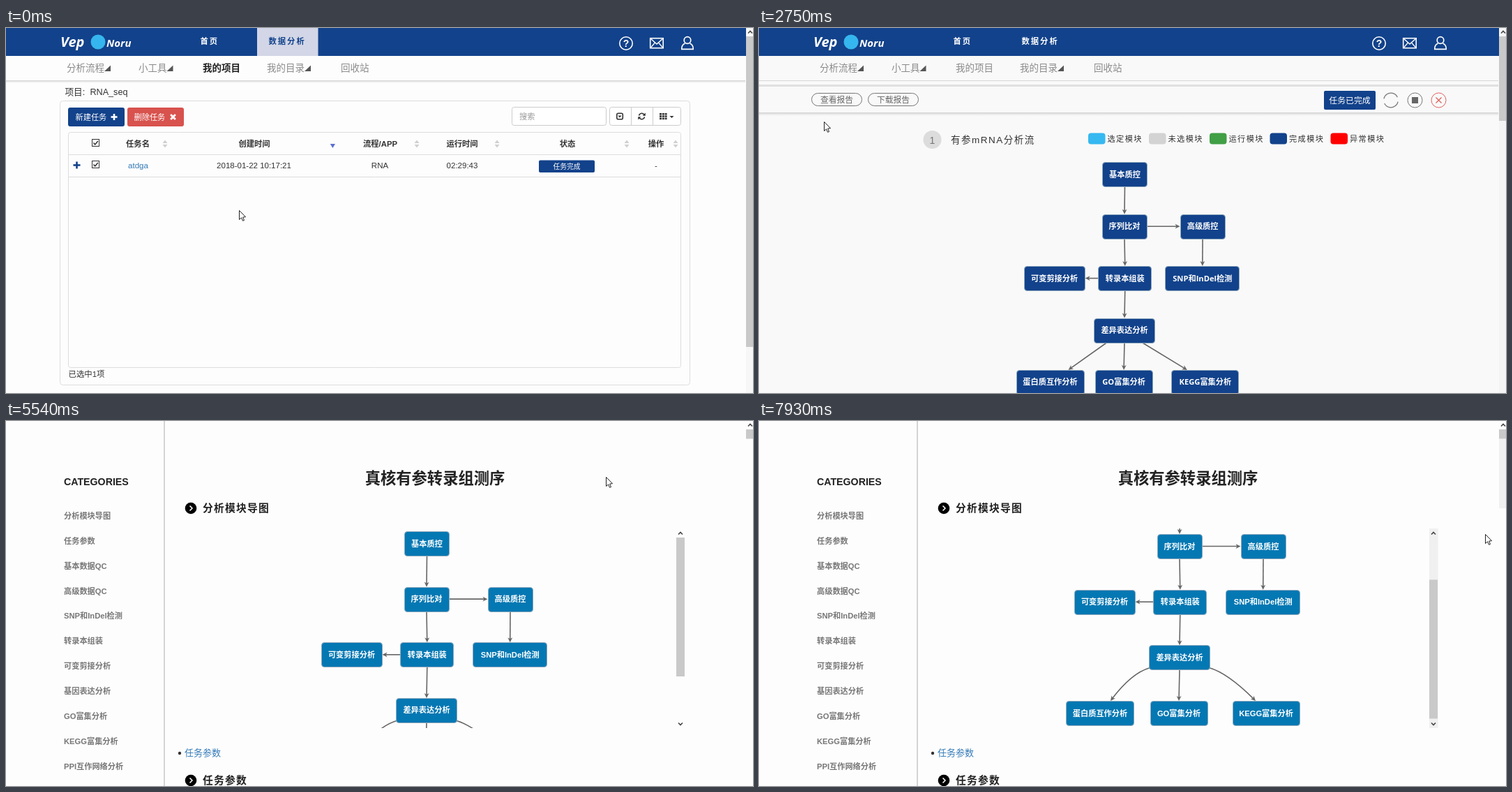
An HTML page with a canvas for the animation above (8 s loop, 1071 px wide and 523 px high).

```html
<!DOCTYPE html>
<html lang="zh-CN">
<head>
<meta charset="utf-8">
<title>任务报告</title>
<style>
html, body { margin: 0; width: 100%; height: 100%; overflow: hidden; background: #fefefe; }
canvas { display: block; width: 1071px; height: 523px; }
</style>
</head>
<body>
<canvas id="stage" width="1071" height="523"></canvas>
<script>
const ctx = document.getElementById('stage').getContext('2d');
const LOOP = 8000;
const NAVY = '#12428b', GRAY = '#666', THUMB = '#c9c9c9';
const SANS = '"Liberation Sans", "Noto Sans CJK SC", "Noto Sans CJK", sans-serif';
const ROUND = '"Open Sans", "Noto Sans CJK SC", "Noto Sans CJK", sans-serif';

// Text with y at its optical middle, on a whole-pixel baseline
function text(s, x, y, size, color, o = {}) {
  ctx.font = `${o.italic ? 'italic ' : ''}${o.bold ? 'bold ' : ''}${size}px ${o.font || SANS}`;
  ctx.letterSpacing = (o.space || 0) + 'px';
  ctx.textAlign = o.align || 'left';
  ctx.fillStyle = color;
  ctx.fillText(s, x, Math.round(y + size * 0.36));
  ctx.letterSpacing = '0px';
}

function rect(x, y, w, h, color) {
  ctx.fillStyle = color;
  ctx.fillRect(x, y, w, h);
}

function box(x, y, w, h, r, fill, stroke, width = 1) {
  ctx.beginPath();
  ctx.roundRect(x, y, w, h, r);
  paint(fill, stroke, width);
}

function circle(x, y, r, fill, stroke, width = 1) {
  ctx.beginPath();
  ctx.arc(x, y, r, 0, 7);
  paint(fill, stroke, width);
}

function paint(fill, stroke, width) {
  if (fill) { ctx.fillStyle = fill; ctx.fill(); }
  if (stroke) { ctx.strokeStyle = stroke; ctx.lineWidth = width; ctx.stroke(); }
}

function line(color, width, ...p) {
  ctx.beginPath();
  for (let i = 0; i < p.length; i += 2) ctx.lineTo(p[i], p[i + 1]);
  paint(null, color, width);
}

function poly(color, ...p) {
  ctx.beginPath();
  for (let i = 0; i < p.length; i += 2) ctx.lineTo(p[i], p[i + 1]);
  ctx.closePath();
  paint(color);
}

function cross(x, y, r, color, width) {
  line(color, width, x - r, y - r, x + r, y + r);
  line(color, width, x + r, y - r, x - r, y + r);
}

function plus(x, y, r, color, width) {
  line(color, width, x - r, y, x + r, y);
  line(color, width, x, y - r, x, y + r);
}

function chevron(x, y, dir) {
  line('#444', 1.6, x - 3, y + 1.5 * dir, x, y - 1.5 * dir, x + 3, y + 1.5 * dir);
}

function scrollbar(thumbEnd, track, trackEnd) {
  if (track) rect(1061, 0, 10, trackEnd, track);
  rect(1061, 12, 10, thumbEnd - 12, THUMB);
  chevron(1067, 6, 1);
}

function shade(y, h, w) {
  const g = ctx.createLinearGradient(0, y, 0, y + h);
  g.addColorStop(0, '#cfcfcf');
  g.addColorStop(1, 'rgba(225,225,225,0)');
  rect(0, y, w, h, g);
}

function header(active) {
  rect(0, 0, 1061, 40, NAVY);
  text('Vep', 78, 20, 20, '#fff', { bold: 1, italic: 1, font: ROUND });
  circle(132, 20, 10.5, '#36b6ee');
  text('Noru', 144, 22, 15, '#fff', { bold: 1, italic: 1, font: ROUND });
  if (active) rect(360, 0, 87.5, 40, '#d2d6e6');
  const bold = { bold: 1, space: 2 };
  text('首页', 278.5, 19, 11.3, '#fff', bold);
  text('数据分析', 376.5, 19, 11.3, active ? NAVY : '#fff', bold);

  circle(889, 22, 9.2, null, '#fff', 1.6);
  text('?', 889, 22, 14, '#fff', { bold: 1, align: 'center' });
  ctx.strokeRect(923.7, 14.7, 18.5, 14);
  line('#fff', 1.5, 924, 15, 933, 23, 942, 15);
  line('#fff', 1.2, 924, 28.5, 930.5, 21);
  line('#fff', 1.2, 942, 28.5, 935.5, 21);
  circle(977, 17.5, 4.8, null, '#fff', 1.7);
  ctx.beginPath();
  ctx.moveTo(973.5, 22);
  ctx.quadraticCurveTo(968.5, 24, 968.8, 30.3);
  ctx.lineTo(985.2, 30.3);
  ctx.quadraticCurveTo(985.5, 24, 980.5, 22);
  paint(null, '#fff', 1.7);

  [['分析流程', 87, 1], ['小工具', 190, 1], ['我的项目', 282, 0], ['我的目录', 374, 1], ['回收站', 480, 0]]
    .forEach(([s, x, menu]) => {
      const on = active && s === '我的项目';
      text(s, x, 57, 13.5, on ? '#222' : '#8a8a8a', { bold: on });
      const e = x + s.length * 13.5;
      if (menu) poly('#555', e + 9, 53.5, e + 9, 62, e, 62);
    });
}

function sorter(x) {
  poly('#d0d0d0', x - 3.5, 165, x, 160.5, x + 3.5, 165);
  poly('#d0d0d0', x - 3.5, 167, x, 171.5, x + 3.5, 167);
}

function checkbox(x, y) {
  ctx.lineWidth = 1;
  ctx.strokeStyle = '#333';
  ctx.strokeRect(x + .5, y + .5, 10, 10);
  line('#222', 1.3, x + 2.5, y + 5.5, x + 4.7, y + 8, x + 8.8, y + 3);
}

function projectPage(hover) {
  rect(0, 0, 1071, 523, '#fdfdfd');
  header(true);
  shade(75, 4, 1060);
  scrollbar(457, '#f7f7f7', 523);
  text('项目:', 84.5, 91, 12.6, '#333');
  text('RNA_seq', 120.5, 91, 12.6, '#333');
  box(77.5, 104.5, 903, 407, 4, null, '#ddd');

  box(89, 114, 81, 27, 3, NAVY);
  text('新建任务', 99.5, 127.5, 11.2, '#fff');
  plus(155, 127.5, 4.5, '#fff', 2.6);
  box(174, 114, 81, 27, 3, '#d8524e');
  text('删除任务', 183.5, 127.5, 11.2, '#fff');
  cross(239.5, 127.5, 3.4, '#fff', 2.8);

  box(725.5, 113.5, 135, 26, 3, '#fff', '#ccc');
  text('搜索', 736, 126.5, 11.2, '#999');
  box(865.5, 113.5, 102, 26, 3, '#fff', '#ccc');
  line('#ccc', 1, 896.5, 114, 896.5, 139);
  line('#ccc', 1, 927.5, 114, 927.5, 139);
  box(875.8, 122.3, 8.5, 8.5, 2, null, '#333', 1.6);
  poly('#333', 877.5, 125.5, 882.5, 125.5, 880, 128.5);
  for (const a of [0, Math.PI]) {
    ctx.save();
    ctx.translate(911.5, 126.5);
    ctx.rotate(a);
    ctx.beginPath();
    ctx.arc(0, 0, 4.2, 3.4, 5.9);
    paint(null, '#333', 1.6);
    poly('#333', 5.3, -5, 5.3, -.8, 1.2, -.8);
    ctx.restore();
  }
  for (let i = 0; i < 9; i++) rect(937 + i % 3 * 3.8, 122 + (i / 3 | 0) * 3.3, 3, 2.5, '#333');
  poly('#333', 951.5, 126, 957.5, 126, 954.5, 129);

  box(89.5, 149.5, 878, 337, 3, null, '#ddd');
  line('#ddd', 1, 90, 181.5, 967, 181.5);
  line('#ddd', 1, 90, 213.5, 967, 213.5);
  checkbox(123, 159);
  checkbox(123, 190);
  plus(101.5, 196.5, 5, NAVY, 2.6);
  const mid = { align: 'center' }, head = { align: 'center', bold: 1 };
  [['任务名', 189], ['创建时间', 356], ['流程/APP', 536.5], ['运行时间', 654], ['状态', 805], ['操作', 932]]
    .forEach(([s, x]) => text(s, x, 166, 11.3, '#333', head));
  [228, 589, 704, 890, 960].forEach(sorter);
  poly('#5b6fd0', 464.8, 166, 472, 166, 468.4, 172);

  const link = hover ? '#23527c' : '#337ab7';
  text('atdga', 189.5, 197, 11.5, link, mid);
  if (hover) line(link, 1, 175, 202.5, 204, 202.5);
  text('2018-01-22 10:17:21', 355.5, 197, 11.5, '#333', mid);
  text('RNA', 536, 197, 11.5, '#333', mid);
  text('02:29:43', 654, 197, 11.5, '#333', mid);
  box(764, 189.5, 80, 17.5, 2, NAVY);
  text('任务完成', 804, 198, 9.8, '#fff', mid);
  text('-', 932, 197, 11.5, '#333', mid);
  text('已选中1项', 89.5, 495.5, 11.4, '#333');
}

// label, x offset from the centre line, row, width, column in the collapsed pile
const NODES = [
  ['基本质控', .5, 0, 65, 1], ['序列比对', 0, 1, 65, 1], ['高级质控', 120, 1, 65, 2],
  ['可变剪接分析', -107.5, 2, 88, 0], ['转录本组装', .8, 2, 77, 1], ['SNP和InDel检测', 119.7, 2, 107, 2],
  ['差异表达分析', 0, 3, 88, 1], ['蛋白质互作分析', -114, 4, 98, 0], ['GO富集分析', -1, 4, 83, 1], ['KEGG富集分析', 124, 4, 97, 2]
];
const EDGES = [[0, 1], [1, 2], [1, 4], [2, 5], [4, 3], [4, 6], [6, 7], [6, 8], [6, 9]];
const NODE_H = 35;

function arrow(x1, y1, x2, y2, cx = (x1 + x2) / 2, cy = (y1 + y2) / 2) {
  const a = Math.atan2(y2 - cy, x2 - cx);
  ctx.beginPath();
  ctx.moveTo(x1, y1);
  ctx.quadraticCurveTo(cx, cy, x2 - 3 * Math.cos(a), y2 - 3 * Math.sin(a));
  paint(null, GRAY, 1.6);
  ctx.save();
  ctx.translate(x2, y2);
  ctx.rotate(a);
  poly(GRAY, 0, 0, -7, -3.4, -5, 0, -7, 3.4);
  ctx.restore();
}

function drawNode(label, x, y, w, fill, font) {
  box(Math.round(x - w / 2) + .5, Math.round(y) + .5, w - 1, NODE_H, 4, fill, '#8fa9bd');
  text(label, x, y + 17.5, 11.2, '#fff', { bold: 1, align: 'center', font });
}

function graph(x0, y0, pitch, scale, fill, font, curved) {
  const at = NODES.map(([, dx, row, w]) => ({ x: x0 + dx * scale, y: y0 + row * pitch, w }));
  for (const [i, j] of EDGES) {
    const a = at[i], b = at[j], side = Math.sign(b.x - a.x);
    if (Math.abs(a.y - b.y) < 1) {
      arrow(a.x + side * a.w / 2, a.y + 17.5, b.x - side * b.w / 2, b.y + 17.5);
    } else if (Math.abs(a.x - b.x) < 5) {
      arrow(a.x, a.y + NODE_H, b.x, b.y);
    } else if (curved) {
      arrow(a.x + side * 43, a.y + 32.5, b.x - side * 15, b.y, a.x + side * 69, a.y + 40);
    } else {
      arrow(a.x + side * 25, a.y + NODE_H, b.x - side * 26, b.y);
    }
  }
  NODES.forEach(([s], i) => drawNode(s, at[i].x, at[i].y, at[i].w, fill, font));
}

function pile(fill) {
  for (const [s, , row, w, col] of NODES) drawNode(s, 565 + col * 5.7 + w / 2, 158 + row * 4, w, fill);
  line(GRAY, 2, 594, 177, 607, 181, 617, 190, 635, 194);
  poly(GRAY, 592, 175, 607, 176, 606, 181);
  poly(GRAY, 603, 180, 617, 185, 620, 192, 610, 187);
  poly(GRAY, 607, 203, 614, 198, 618, 207, 613, 203);
}

function flowPage() {
  rect(0, 0, 1071, 523, '#f9f9f9');
  header(false);
  line('#d8d8d8', 1, 0, 75.5, 1060, 75.5);
  rect(0, 81, 1060, 3, '#e0e0e0');
  shade(121, 5, 1060);
  scrollbar(133, '#f4f4f4', 523);
  [['查看报告', 75], ['下载报告', 156]].forEach(([s, x]) => {
    box(x + .5, 93.5, 72, 18, 9, null, '#777');
    text(s, x + 36.5, 102.5, 11.8, '#666', { align: 'center' });
  });
  box(810, 90, 74, 27, 2, NAVY);
  text('任务已完成', 847, 103.5, 11.9, '#fff', { align: 'center' });
  for (const a of [.2, 3.35]) {
    ctx.beginPath();
    ctx.arc(906, 103.5, 10.3, a, a + 2.5);
    paint(null, '#777', 1.2);
  }
  circle(940.5, 103.5, 10.5, null, '#777');
  rect(936, 99, 9, 9, '#666');
  circle(974.5, 103.5, 10.5, null, '#e0605c');
  cross(974.5, 103.5, 4, '#e0605c', 1.2);

  circle(248.5, 160, 13, '#dcdcdc');
  text('1', 248.5, 160.5, 14, '#777', { align: 'center' });
  text('有参mRNA分析流', 275, 160.5, 13.5, '#333', { space: 1.5 });
  [['选定', '#36b8f0', 472], ['未选', '#d3d3d3', 559], ['运行', '#419f45', 646], ['完成', NAVY, 732.5], ['异常', '#f00', 819.5]]
    .forEach(([s, c, x]) => {
      box(x, 150.5, 24.5, 16, 4, c);
      text(s + '模块', x + 27.5, 158.5, 11.2, '#333', { space: 1.4 });
    });
  graph(524, 192.3, 74.4, .934, NAVY, ROUND, false);
}

function heading(s, y) {
  circle(265, y, 8.3, '#000');
  line('#fff', 1.5, 263.5, y - 3.5, 267, y, 263.5, y + 3.5);
  text(s, 282, y - .5, 14.8, '#222', { bold: 1, space: 1.2 });
}

const TOPICS = ['分析模块导图', '任务参数', '基本数据QC', '高级数据QC', 'SNP和InDel检测', '转录本组装',
  '可变剪接分析', '基因表达分析', 'GO富集分析', 'KEGG富集分析', 'PPI互作网络分析'];

function reportPage(t) {
  const blue = '#0478b3';
  rect(0, 0, 1071, 523, '#fdfdfd');
  rect(226, 0, 2, 523, '#d3d3d8');
  text('CATEGORIES', 83, 87, 14.2, '#222', { bold: 1 });
  TOPICS.forEach((s, i) => text(s, 83, 136 + i * 35.85, 11.2, '#777', { bold: 1 }));
  text('真核有参转录组测序', 615, 82, 22.3, '#222', { bold: 1, align: 'center' });
  heading('分析模块导图', 125);
  circle(249, 476, 2.2, '#333');
  text('任务参数', 256, 475, 13, '#337ab7');
  heading('任务参数', 515);
  if (t >= 6400) rect(1061, 26, 10, 99, '#f0f0f0');
  scrollbar(25.5);

  const scroll = t < 7050 ? 0 : t < 7260 ? 14 : t < 7480 ? 34 : 75.6;
  ctx.save();
  ctx.beginPath();
  ctx.rect(430, 154, 531, 286);
  ctx.clip();
  if (t < 5320) pile(blue);
  else graph(603, 158 - scroll, 79.65, 1, blue, SANS, true);
  ctx.restore();
  if (scroll) rect(961, 154, 12.5, 286, '#f0f0f0');
  rect(961, 167 + scroll * .8, 12, 199, THUMB);
  chevron(967, 161, 1);
  chevron(967, 434, -1);
}

function status(w) {
  box(-4.5, 520.5, w + 4, 10, [0, 2, 0, 0], '#fdfdfd', '#bdbdbd');
}

// Pointer positions: start time, x, y
const PATH = [
  [0, 334, 261], [430, 302, 249], [640, 258, 229], [850, 220, 211], [1060, 196, 197],
  [1910, 190, 194], [2120, 165, 180], [2330, 136, 163], [2540, 109, 146], [2750, 93, 134], [2970, 96, 117], [3180, 101, 102],
  [4250, 180, 106], [4460, 330, 113], [4680, 490, 120], [4890, 610, 126], [5110, 671, 129],
  [5320, 760, 110], [5530, 860, 80], [5750, 950, 52], [5970, 1020, 34], [6190, 1061, 22], [6400, 1020, 108], [6620, 982, 187],
  [6840, 967, 192], [7050, 967, 204], [7260, 967, 219], [7480, 967, 252], [7700, 1006, 202], [7930, 1041, 162]
];

function pointer(t, hand) {
  const [, x, y] = PATH.findLast(p => p[0] <= t);
  ctx.save();
  ctx.translate(x + .5, y + .5);
  ctx.lineJoin = 'round';
  if (hand) {
    ctx.beginPath();
    ctx.roundRect(-1.5, 0, 3.2, 11, 1.6);
    ctx.roundRect(-1.5, 5, 9.5, 9.5, 2.5);
    paint('#fff', '#222', 1);
    poly('#fff', -1, 6, -4.5, 7, -1, 13);
    line('#222', 1, -1.5, 8, -4.5, 7, -1, 13.5);
    rect(-1, 2, 2.2, 9, '#fff');
  } else {
    ctx.beginPath();
    [[0, 0], [0, 13], [3, 10.3], [5, 14.8], [7, 14], [5.1, 9.6], [9, 9.2]].forEach(p => ctx.lineTo(...p));
    ctx.closePath();
    paint('#fff', '#222', 1);
  }
  ctx.restore();
}

function render(t) {
  const onTask = t >= 1060 && t < 1480, onReport = t >= 3180 && t < 3600;
  if (t < 1480) projectPage(onTask);
  else if (t >= 1910 && t < 3600) flowPage();
  else if (t >= 4680) reportPage(t);
  else {
    rect(0, 0, 1071, 523, '#fefefe');
    status(207);
  }
  if (onTask) status(467);
  if (onReport) status(697);
  pointer(t, onTask || onReport);
}

const start = performance.now();
function tick() {
  render((performance.now() - start) % LOOP);
  requestAnimationFrame(tick);
}
tick();
</script>
</body>
</html>
```
